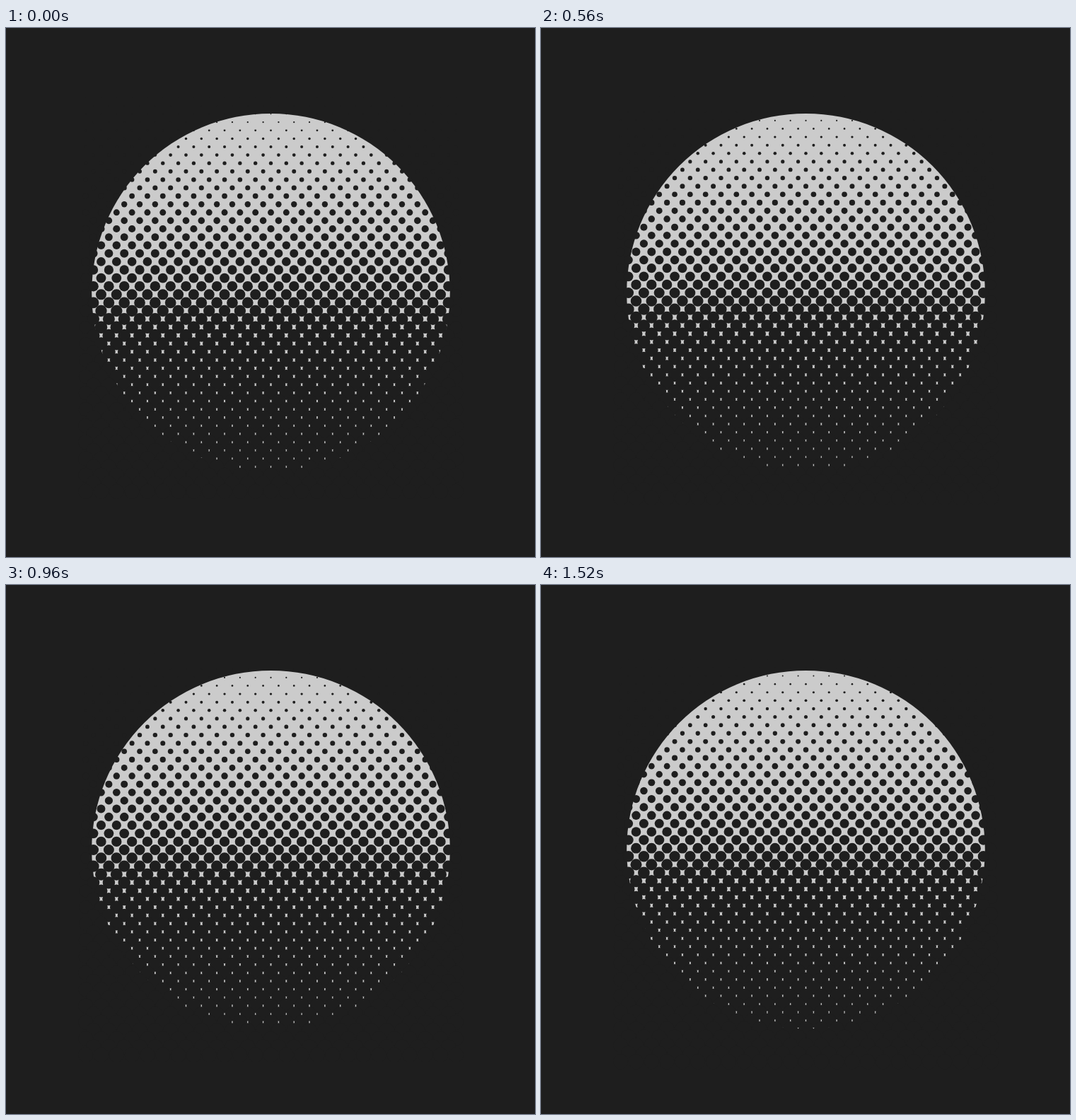
An HTML page with a canvas that plays this animation: 748 by 748 pixels, repeating every 1600 ms.

```html
<!DOCTYPE html>
<html>
<head>
<meta charset="utf-8">
<style>
  html, body { margin: 0; height: 100%; overflow: hidden; background: #1e1e1e; }
  canvas { display: block; }
</style>
</head>
<body>
<canvas id="stage" width="748" height="748"></canvas>
<script>
const ctx = document.getElementById('stage').getContext('2d');
const DARK = '#1e1e1e', LIGHT = '#cbcbcb';
const CENTER_X = 374.5, CENTER_Y = 374.2, RADIUS = 253.3;
const COL = 10.91, ROW = 11.6;      // half the pitch of the staggered grid
const TOP = 121.6;
const STEP = 80, STEPS = 5;         // the grid moves down one full pitch per cycle

// Dots grow linearly down the disc until they touch, then level off.
function dotRadius(y) {
  const touch = 8, extra = 2.5;
  const r = Math.max(0, 0.0264 * (y - 91));
  return r < touch ? r : touch + extra * (1 - Math.exp((touch - r) / 2.1));
}

function disc(x, y, r, color) {
  ctx.fillStyle = color;
  ctx.beginPath();
  ctx.arc(x, y, r, 0, Math.PI * 2);
  ctx.fill();
}

function draw(time) {
  const phase = Math.floor(time / STEP) % STEPS / STEPS;
  ctx.fillStyle = DARK;
  ctx.fillRect(0, 0, 748, 748);
  disc(CENTER_X, CENTER_Y, RADIUS, LIGHT);
  for (let row = -4; row < 47; row++) {
    const y = TOP + (row + 2 * phase) * ROW;
    for (let col = -24; col <= 24; col++) {
      if ((row + col) % 2 === 0) disc(CENTER_X + col * COL, y, dotRadius(y), DARK);
    }
  }
}

const start = performance.now();
function tick() {
  draw(performance.now() - start);
  requestAnimationFrame(tick);
}
tick();
</script>
</body>
</html>
```
